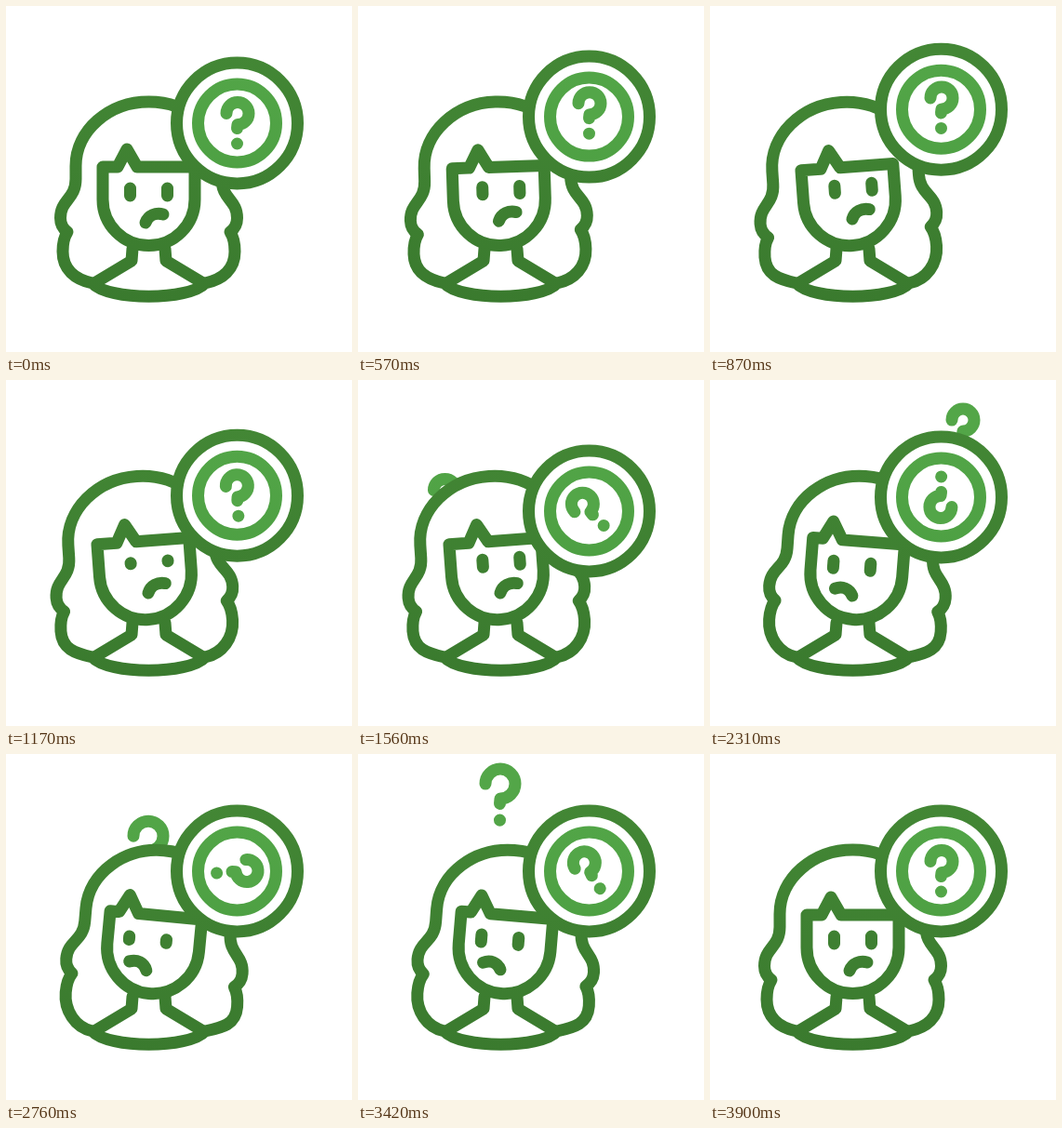
An HTML page with a canvas that plays this animation: 372 by 372 pixels, repeating every 4500 ms.

```html
<!DOCTYPE html>
<html lang="en">
<head>
<meta charset="utf-8">
<title>Puzzled woman</title>
<style>
  html, body { margin: 0; height: 100%; overflow: hidden; background: #fff; }
  canvas { display: block; }
</style>
</head>
<body>
<canvas id="stage" width="372" height="372"></canvas>
<script>
const ctx = document.getElementById('stage').getContext('2d');
const LOOP = 4500, AXIS = 153.5;

const gradient = (from, to) => {
  const g = ctx.createLinearGradient(0, 50, 0, 320);
  g.addColorStop(0, from);
  g.addColorStop(1, to);
  return g;
};
const dark = gradient('#438735', '#3a7a2e');
const light = gradient('#53a648', '#489a3e');

const smooth = p => p * p * (3 - 2 * p);
const linear = p => p;
const mix = (a, b, p) => a + (b - a) * p;

// Value at time t along [time, value] keys.
function track(t, keys, ease = smooth) {
  if (t <= keys[0][0]) return keys[0][1];
  for (let i = 1; i < keys.length; i++) {
    const [t0, v0] = keys[i - 1], [t1, v1] = keys[i];
    if (t < t1) return mix(v0, v1, ease((t - t0) / (t1 - t0)));
  }
  return keys[keys.length - 1][1];
}

const LEAN = [[330, 0], [840, -4.2], [1680, -4.2], [2460, 5.4], [3300, 5.4], [3870, 0]];
const MOUTH = [[1680, 0], [2460, 1], [3300, 1], [3870, 0]];
const BLINK = [[990, 4], [1140, 0], [1290, 4], [2540, 4], [2690, 0], [2840, 4]];
const BOB = [[330, 0], [840, -15], [1560, 15], [2200, 0]];
const LIFT = [[330, 0], [585, -4], [1110, 0]];
const SPIN = [[1110, 0], [1350, 14], [1950, 103], [2760, 275], [3420, 392], [3500, 395], [3870, 360]];

// Marks that float up from behind the head and the badge.
const GHOSTS = [
  { x: 93.5, r: 12, rise: [[1170, 143], [2150, 35]], off: 2150 },
  { x: 272, r: 12, rise: [[1600, 87], [2580, 1]], off: 2580 },
  { x: 153, r: 16, rise: [[2300, 105], [3440, 8]], off: 3570 },
];

const hairLeft = [
  [AXIS, 103],
  [110.5, 103], [75, 134], [75, 172],
  [75, 178], [75, 180], [75, 186],
  [75, 208], [58.5, 208], [58.5, 228],
  [58.5, 235], [62, 240], [66, 243],
  [62, 249], [61, 256], [61, 264],
  [61, 283], [74, 294], [93, 298],
];
const hairRight = hairLeft.map(([x, y]) => [2 * AXIS - x, y]).reverse();
const outline = [...hairLeft, [110, 317], [197, 317], ...hairRight];
const neck = new Path2D('M136 261L135 274L95 298M171 261L172 274L212 298');

function rotate([x, y], angle, cy) {
  const c = Math.cos(angle), s = Math.sin(angle), dx = x - AXIS, dy = y - cy;
  return [AXIS + dx * c - dy * s, cy + dx * s + dy * c];
}

function stroke(color, path) {
  ctx.strokeStyle = color;
  path ? ctx.stroke(path) : ctx.stroke();
}

function ring(x, y, r, color) {
  ctx.beginPath();
  ctx.arc(x, y, r, 0, 7);
  ctx.fill();
  stroke(color);
}

// Question mark whose hook is centred on x, y.
function question(x, y, r, dotGap) {
  ctx.beginPath();
  ctx.arc(x, y, r, Math.PI, Math.PI / 2);
  ctx.lineTo(x - 0.5, y + r + r / 3);
  ctx.moveTo(x - 0.5, y + r + dotGap);
  ctx.lineTo(x - 0.5, y + r + dotGap + 0.01);
  stroke(light);
}

function drawGhost(t, { x, r, rise, off }) {
  if (t < rise[0][0] || t > off + 150) return;
  ctx.globalAlpha = track(t, [[off, 1], [off + 150, 0]], linear);
  question(x, track(t, rise, linear) + 6.5 + r, r, r === 12 ? 21.5 : 23);
  ctx.globalAlpha = 1;
}

function drawHair(angle) {
  const p = outline.map(q => q[1] < 290 ? rotate(q, angle, 298) : q);
  ctx.beginPath();
  ctx.moveTo(...p[0]);
  for (let i = 1; i < p.length; i += 3) ctx.bezierCurveTo(...p[i], ...p[i + 1], ...p[i + 2]);
  ctx.closePath();
  ctx.fill();
  stroke(dark);
  stroke(dark, neck);
}

function drawFace(t, lean) {
  const shift = -1.2 * lean;
  ctx.save();
  ctx.translate(AXIS, 257);
  ctx.rotate(lean * Math.PI / 180);
  ctx.translate(-AXIS, -257);

  ctx.beginPath();
  ctx.moveTo(104, 173);
  ctx.lineTo(120 + shift, 173);
  ctx.lineTo(130 + shift, 154);
  ctx.lineTo(141 + shift, 173);
  ctx.lineTo(203, 173);
  ctx.lineTo(203, 208);
  ctx.arc(AXIS, 208, 49.5, 0, Math.PI);
  ctx.closePath();
  stroke(dark);

  ctx.translate(shift, 0.95 * Math.min(lean, 0));
  const half = track(t, BLINK) + 0.01;
  const m = track(t, MOUTH);
  ctx.beginPath();
  for (const x of [133.5, 173.5]) {
    ctx.moveTo(x, 200 - half);
    ctx.lineTo(x, 200 + half);
  }
  ctx.moveTo(mix(150, 136, m), mix(233, 225, m));
  ctx.bezierCurveTo(
    mix(153, 144, m), mix(225, 222, m),
    mix(161, 152, m), mix(222, 225, m),
    mix(169, 155, m), mix(224, 233, m));
  stroke(dark);
  ctx.restore();
}

function drawBadge(t) {
  const x = 248.5, y = 126 + track(t, BOB);
  ring(x, y, 65, dark);
  ring(x, y, 42, light);
  ctx.save();
  ctx.translate(x, y + track(t, LIFT));
  ctx.rotate(-track(t, SPIN, linear) * Math.PI / 180);
  question(0.5, -10.5, 12, 20.5);
  ctx.restore();
}

function draw(now) {
  const t = now % LOOP, lean = track(t, LEAN);
  ctx.fillStyle = '#fff';
  ctx.fillRect(0, 0, 372, 372);
  ctx.lineWidth = 13;
  ctx.lineCap = ctx.lineJoin = 'round';
  GHOSTS.forEach(g => drawGhost(t, g));
  drawHair(lean * 0.9 * Math.PI / 180);
  drawFace(t, lean);
  drawBadge(t);
}

const start = performance.now();
(function tick() {
  draw(performance.now() - start);
  requestAnimationFrame(tick);
})();
</script>
</body>
</html>
```
